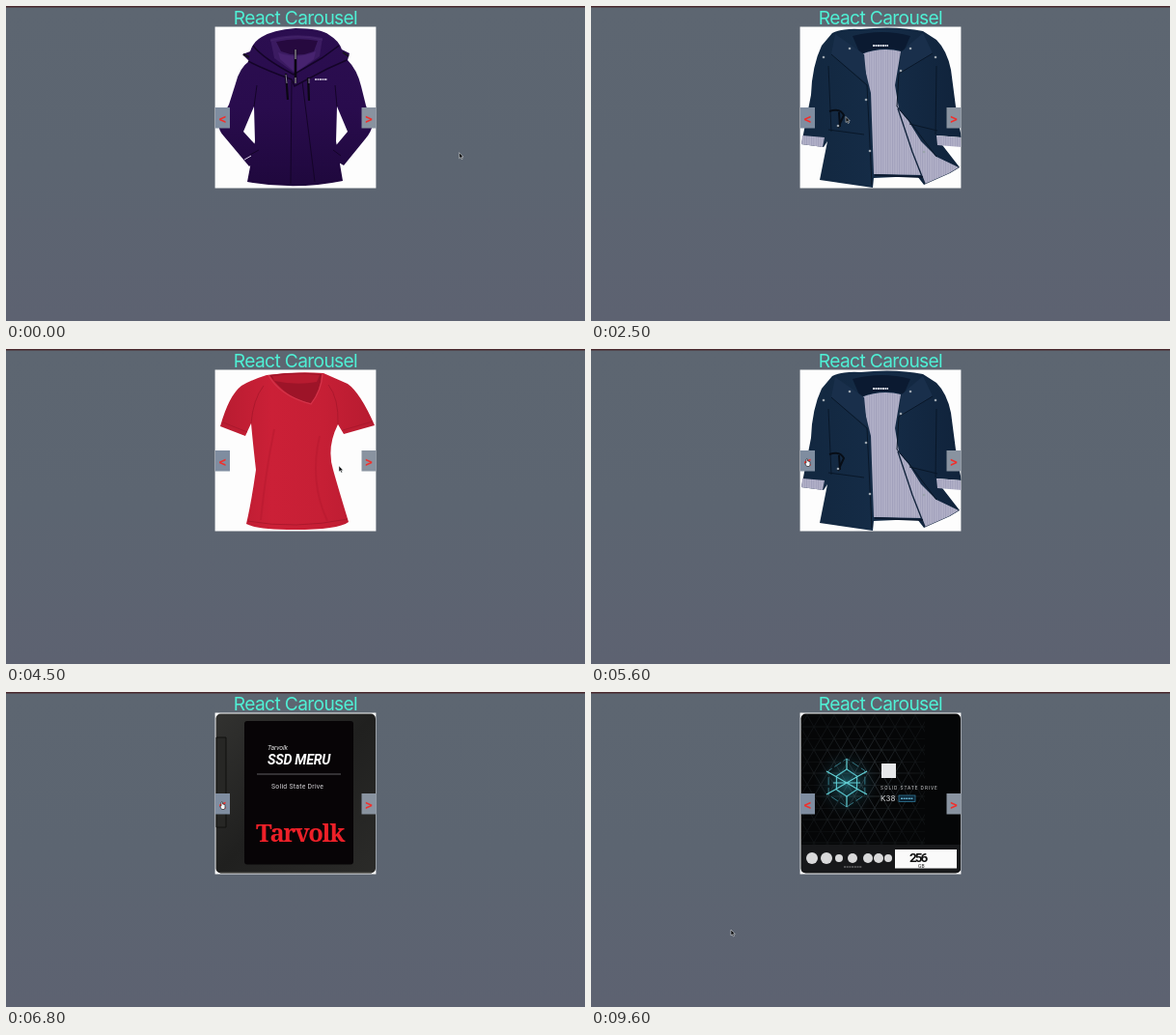
Write an HTML page that moves like this. It is 600 px wide and 326 px high and loops after 9.7 s.

```html
<!DOCTYPE html>
<html lang="en">
<head>
<meta charset="utf-8">
<title>React Carousel</title>
<style>
  html, body { margin: 0; width: 100%; height: 100%; overflow: hidden; background: #5c6571; }
  svg { display: block; width: 100%; height: 100%; }
  text { font-family: Inter, "Open Sans", sans-serif; }
  .serif { font-family: "Noto Serif", "Liberation Serif", serif; }
  .narrow { font-family: Roboto, sans-serif; }
  .title { font-size: 19.2px; letter-spacing: -.65px; fill: #4ff0d5; text-anchor: middle; }
  .arrow { font-size: 13px; font-weight: 700; fill: #f0302c; text-anchor: middle; }
</style>
</head>
<body>
<svg id="stage" viewBox="0 0 600 326" preserveAspectRatio="none"></svg>
<script>
const LOOP = 9700;

const path = (d, fill, extra = "") => `<path d="${d}" fill="${fill}" ${extra}/>`;
const line = (d, stroke, width = 1, extra = "") =>
  `<path d="${d}" fill="none" stroke="${stroke}" stroke-width="${width}" ${extra}/>`;
const rect = (x, y, w, h, fill, extra = "") =>
  `<rect x="${x}" y="${y}" width="${w}" height="${h}" fill="${fill}" ${extra}/>`;
const dot = (x, y, r, fill) => `<circle cx="${x}" cy="${y}" r="${r}" fill="${fill}"/>`;
const text = (x, y, size, fill, content, extra = "") =>
  `<text x="${x}" y="${y}" font-size="${size}" fill="${fill}" ${extra}>${content}</text>`;
const gradient = (id, stops, extra = "") =>
  `<linearGradient id="${id}" ${extra}>${stops.map((color, i) =>
    `<stop offset="${i / (stops.length - 1)}" stop-color="${color}"/>`).join("")}</linearGradient>`;

const defs = `<defs>
  ${gradient("backdrop", ["#5d6671", "#5c6571", "#5d6271"], 'x2="0" y2="1"')}
  ${gradient("purple", ["#2b0e50", "#290c4d", "#1f083d"], 'x2="0" y2="1"')}
  ${gradient("navy", ["#12273f", "#152c47", "#10233b"])}
  ${gradient("red", ["#b81c31", "#cb2037", "#c61f35", "#b71b30"])}
  ${gradient("white", ["#e2e2e5", "#fafafa", "#dedee2"])}
  ${gradient("metal", ["#55565b", "#a4a5a9", "#77787d"])}
  ${gradient("casing", ["#323230", "#20201f", "#2b2b29"], 'x2="1" y2="1"')}
  ${gradient("screen", ["#18365c", "#7e3f89", "#df804c"], 'x2="1" y2="1"')}
  <radialGradient id="glow"><stop stop-color="#2c94a4" stop-opacity=".55"/>
    <stop offset="1" stop-color="#10202a" stop-opacity="0"/></radialGradient>
  <radialGradient id="meshFade"><stop stop-color="#fff"/><stop offset="1" stop-color="#444"/></radialGradient>
  <pattern id="knit" width="2.4" height="2.4" patternUnits="userSpaceOnUse">
    ${rect(0, 0, 2.4, 2.4, "#b2b1c8")}${rect(0, 0, .9, 2.4, "#9f9eb9")}</pattern>
  <pattern id="mesh" width="14" height="24" patternUnits="userSpaceOnUse">
    ${line("M0 0H14M0 12H14M0 0L14 24M14 0L0 24", "#363e42", .8)}</pattern>
  <clipPath id="frame">${rect(216.6, 21.6, 166.8, 166.8, "#fff")}</clipPath>
  <mask id="meshMask">${rect(217, 22, 130, 140, "url(#meshFade)")}</mask>
</defs>`;

function purpleJacket() {
  const shade = "#140428", edge = "#432468";
  return path("M253 47Q256 37 265 32Q276 25 300 23Q326 23 335 30Q345 36 348 45L356 49L354 56Q364 66 368 83L373 103L380 122Q379 130 372 138L350 165L333 155L354 130L343 104L342 140L349 181Q300 191 250 182L258 140L257 104L246 130L268 154L252 166L226 135Q219 128 221 120L231 102L238 80Q242 64 252 57L245 50Z", "url(#purple)") +
    path("M274 34Q300 27 328 33L325 52L300 70L278 54Z", "#3b1b61") +
    path("M280 37Q301 32 323 36L319 47Q302 54 285 47Z", "#26093f") +
    path("M282 48Q301 56 321 47L319 55L300 69L284 55Z", "#47236f") +
    line("M256 41Q266 54 298 71L327 54L345 41M251 57Q266 65 296 76L299 83L333 65L353 56", shade, 1.5) +
    line("M274 36Q301 28 328 35", edge, 1.2) +
    line("M296 78L295 184M307 78L320 182M257 104L260 82M343 104L341 82M253 154L262 149M347 155L339 149", shade) +
    line("M300 45L300 80", "#0a0610", 2.6) + line("M300 45V55M300 74V80", "#bcb5c3", 1) +
    line("M290 70L292 97M313 74L314 98", "#0b0713", 2.2) +
    line("M290 71L291 80M314 75V80", "#a99db8", .8) +
    line("M320 76H333", "#dad3e5", 1.5, 'stroke-dasharray="2 .5"') +
    line("M247 159L254 155", "#d8cde4", 1) +
    line("M246 50L252 53M349 48L355 52", "#17131d", 2);
}

function leatherJacket() {
  return path("M260 36Q300 18 341 36L359 55L378 148L363 155L344 92L346 181H255L257 92L239 155L223 148L242 55Z", "#201f23") +
    path("M262 35Q300 18 338 35L330 62L303 76L271 62Z", "#8b8b90") +
    path("M277 38Q300 29 324 38L309 70L303 184H292L293 70Z", "#b2b2b6") +
    path("M263 51L287 61L295 184H255L257 90ZM340 51L313 62L304 184H347L344 90Z", "#29282c") +
    line("M290 62L295 183M312 62L304 183M267 132L281 126M321 126L336 132", "#9a9a9d", 1.2);
}

function navyJacket() {
  const studs = [[241, 53], [268, 44], [285, 97], [289, 150], [321, 67], [331, 44], [357, 53], [256, 124], [345, 151]];
  return path("M250 28Q260 23 279 24Q315 20 344 26L358 35Q369 46 373 66L379 112L384 136L358 134L361 140L382 167L372 173L345 185L338 176L293 178L292 188L237 180L245 140L241 146L218 143L228 92Q229 62 239 41Z", "url(#navy)") +
    path("M280 50Q301 42 321 47L315 82L319 106L334 150L344 175L293 174L290 90Z", "url(#knit)") +
    path("M318 106L329 119L342 140L358 156L381 167L371 173L346 184L333 151Z", "url(#knit)") +
    line("M318 106L333 151L346 184", "#14263e", 1.4) +
    path("M271 31Q302 23 331 31L324 47Q302 40 279 50Z", "#0b1a31") +
    path("M253 29L283 50L286 80L249 50ZM344 28L322 47L319 70L354 49Z", "#192f4b") +
    line("M249 50L286 82L291 185M354 49L319 70L317 104L330 119L358 156M246 128L283 133M330 122L359 129M246 62L249 130M358 62L357 133", "#091728", 1) +
    line("M292 41H308", "#d7dbe4", 2, 'stroke-dasharray="2 .5"') +
    line("M247 109Q258 105 262 113L256 126M257 110L258 125", "#070d16", 2) +
    line("M294 175L344 177", "#0d1b30", 2) +
    path("M219 134L242 136L240 146L218 143ZM358 134L383 136L384 146L359 144Z", "url(#knit)") +
    studs.map(([x, y]) => dot(x, y, 1.3, "#9ba4ad")).join("");
}

function whiteTop() {
  return path("M262 29Q300 44 338 29Q355 33 365 44L379 86L350 96L343 76Q340 122 352 179Q302 191 249 179Q261 121 257 76L249 96L222 86L237 44Q246 34 262 29Z", "url(#white)") +
    line("M262 30Q300 49 338 30M257 76L254 58M343 76L346 58M278 92Q271 128 265 179M320 92Q326 137 331 179", "#c8c8cd", 1);
}

function redShirt() {
  return path("M270 27Q300 23 329 25L354 36Q367 45 382 79L350 88L344 78Q332 102 339 125Q344 143 355 179Q344 187 299 187Q260 187 249 181Q254 160 259 125Q256 99 254 77L248 90L222 80Q231 48 244 38Q254 32 270 27Z", "url(#red)") +
    path("M273 27Q300 23 327 26Q326 43 316 56Q291 52 273 27Z", "#9d1428") +
    path("M276 28Q300 24 325 27L322 34Q302 38 278 33Z", "#b71b30") +
    line("M272 27Q283 48 316 57Q327 43 328 26", "#d5344a", 1.2) +
    line("M254 77Q256 52 267 38M344 78Q345 51 334 37M225 76L250 86M349 84L380 75M250 178Q300 187 354 176", "#a6172b", .8) +
    line("M278 83Q269 127 264 177M325 90Q314 137 333 178", "#b5192f", 2, 'opacity=".5"');
}

function curvedMonitor() {
  const rays = Array.from({ length: 25 }, (_, i) => {
    const a = Math.PI * (-.15 + i * 1.3 / 24), c = Math.cos(a), s = Math.sin(a);
    return `M${295 + 13 * c} ${106 + 8 * s}L${295 + 33 * c} ${106 + 26 * s}`;
  }).join("");
  const slogan = ["QLED", "GAMING", "MONITOR"].map((word, i) =>
    text(0, i * 13, 13.3, "#e9e9ec", word, 'class="narrow" font-weight="700" letter-spacing="-1.15"')).join("");
  return path("M218 22Q304 39 383.5 45V133Q300 138 218 152Z", "#040405") +
    line("M218 23Q304 39 383 45.5", "#54575b", .9) +
    line("M218 151Q300 137 383 132.5", "#67696e", 1.8) +
    text(224, 38, 4.5, "#eee", "QUOLVEN", 'font-weight="700" transform="rotate(5 224 38)"') +
    path("M287 70Q293 64 302 70L304 84L300 91L307 97L316 111L313 134L276 139L274 112L281 97L288 91Z", "#2c3035") +
    path("M291 70Q299 67 301 80L296 89L291 83ZM282 101L292 96L296 115L284 121ZM304 99L313 111L307 123Z", "#626a70") +
    line(rays, "#5aaccc", .8) +
    `<g transform="translate(321 89) rotate(-6)">${slogan}</g>` +
    path("M270 144L281 142V163L270 165Z", "#24262a") + line("M270 144V166", "#aaa", 1.5) +
    path("M268 165L284 162L369 163L368 168L302 170L268 187L261 187L279 169L268 170Z", "url(#metal)") +
    line("M262 186L284 170L368 166", "#d0d0d3", 1);
}

function flatMonitor() {
  return rect(219, 42, 162, 100, "#191a1d", 'rx="2"') + rect(222, 45, 156, 91, "url(#screen)") +
    path("M222 112Q270 60 319 94T378 64V136H222Z", "#203e69", 'opacity=".65"') +
    path("M294 142H307L311 162H290Z", "#27282b") + path("M268 168L291 160H312L333 168Z", "#333438");
}

function portableDrive() {
  return rect(240, 27, 121, 157, "#191a1c", 'rx="5"') + path("M242 29H359V83L242 116Z", "#2a2b2e") +
    line("M242 116L359 83M246 125L355 94", "#47494c", 1.2) + rect(253, 158, 10, 10, "#bfc1c4");
}

function redDrive() {
  return rect(217.5, 22.5, 165.5, 165, "url(#casing)", 'rx="5"') +
    line("M222 187H379", "#52524e", 1) +
    path("M218 47H228V140H218Z", "#272725", 'stroke="#11110f" stroke-width="1"') +
    rect(247, 30, 113, 148.5, "#070406", 'rx="3"') +
    text(271, 60, 7, "#ddd", "Tarvolk", 'class="narrow" font-style="italic" letter-spacing="-.15"') +
    text(271, 75, 14.2, "#fff", "SSD MERU", 'class="narrow" font-style="italic" font-weight="700" letter-spacing="-.25"') +
    line("M260 85H347", "#77767a", .8) +
    text(275, 99.5, 6.8, "#d6d5d8", "Solid State Drive", 'class="narrow" letter-spacing=".28"') +
    text(259, 155, 25.5, "#ed2028", "Tarvolk", 'class="serif" font-weight="600" letter-spacing="-1.4"');
}

function blueDrive() {
  const hexagon = (r) => "M" + Array.from({ length: 6 }, (_, i) => {
    const a = Math.PI * (i / 3 + .5);
    return `${265 + r * .87 * Math.cos(a)} ${94 + r * Math.sin(a)}`;
  }).join("L") + "Z";
  const marks = [[229, 6], [244, 6], [257, 4], [271, 5], [287, 5], [298, 5], [308, 4]];
  return rect(217.5, 22.5, 165.5, 165, "#050607", 'rx="5"') +
    rect(218, 23, 128, 136, "url(#mesh)", 'mask="url(#meshMask)"') +
    dot(265, 94, 35, "url(#glow)") +
    line(hexagon(25), "#347784", 1, 'stroke-dasharray="8 3"') + line(hexagon(14), "#53bdc6", 1.2) +
    line("M265 80V69M265 108V119M253 87L244 82M277 87L286 82M253 101L244 106M277 101L286 106M253 87L277 101M277 87L253 101M251 94H279", "#63d0d5", 1.2) +
    rect(301, 74, 15, 15, "#e6e7e9") +
    text(300, 101, 4.7, "#d5d6d8", "SOLID STATE DRIVE", 'letter-spacing=".9"') +
    text(300, 113, 8, "#d7d8da", "K38", 'letter-spacing=".1"') +
    rect(319, 107, 17, 6.5, "#0c2333", 'stroke="#3484a7" stroke-width=".7"') +
    line("M321 110.3H334", "#62aeca", 1.5, 'stroke-dasharray="2 .6"') +
    path("M218 158H383V184Q382 187 378 187H223Q218 187 218 184Z", "#17181a") +
    marks.map(([x, r]) => dot(x, 172, r, "#d9d9da")).join("") +
    line("M262 181H281", "#aaa", .8, 'stroke-dasharray="2 .7"') +
    rect(315, 163, 64, 19.5, "#fafafa") +
    text(330, 175.5, 13.5, "#111", "256", 'class="narrow" font-weight="700" letter-spacing="-2"') +
    text(339, 181.5, 5, "#222", "GB", 'class="narrow"');
}

const slides = [redDrive, blueDrive, portableDrive, flatMonitor, curvedMonitor,
  purpleJacket, leatherJacket, navyJacket, whiteTop, redShirt];

const button = (x, sign, fill) => rect(x, 105, 15, 21.5, fill) +
  `<text class="arrow" x="${x + 7.4}" y="120.9">${sign}</text>`;

const stage = document.getElementById("stage");
stage.innerHTML = defs +
  rect(0, 0, 600, 326, "url(#backdrop)") + rect(0, 0, 600, 1.5, "#49282d") +
  `<text class="title" x="300" y="19.3">React Carousel</text>` +
  `<g clip-path="url(#frame)">${rect(216, 21, 169, 169, "#fdfdfd")}
    ${slides.map((draw) => `<g class="slide">${draw()}</g>`).join("")}</g>` +
  button(217, "&lt;", "#7f8da0") + button(368.5, "&gt;", "#8993a0") +
  `<g id="pointer">
    ${path("M0 0V6L1.4 4.8L2.4 7L3.5 6.5L2.5 4.4H4.3Z", "#08090b", 'stroke="#e2e5e8" stroke-width=".55"')}
    ${path("M1 1Q2 0 2.6 1V3L5 3.6V7L4.2 8.5H1.6L-.3 5.6L1 5Z", "#f4f4f6", 'stroke="#24262b" stroke-width=".7"')}
  </g>`;

const slideNodes = [...stage.querySelectorAll(".slide")];
const pointer = stage.querySelector("#pointer");
const [arrowCursor, handCursor] = pointer.children;
const show = (node, visible) => { node.style.display = visible ? "" : "none"; };

// Pointer stops: time, x, y
const stops = [[0, 469.6, 151.7], [1650, 469.6, 151.7], [2450, 264, 114.5], [2700, 264, 114.5],
  [3300, 345, 121], [4700, 345, 121], [5200, 222, 113], [7000, 222, 113], [7600, 145, 246], [LOOP, 145, 246]];

function pointerAt(t) {
  const i = stops.findIndex((stop) => stop[0] > t);
  const [t0, x0, y0] = stops[i - 1], [t1, x1, y1] = stops[i];
  const p = (t - t0) / (t1 - t0), ease = p * p * (3 - 2 * p);
  return [x0 + (x1 - x0) * ease, y0 + (y1 - y0) * ease];
}

// Automatic steps forward, then quick clicks back, then automatic again
function slideAt(t) {
  if (t < 700) return 5;
  if (t < 5400) return Math.min(9, 6 + Math.floor((t - 700) / 1100));
  if (t < 8600) return Math.max(0, 8 - Math.floor((t - 5400) / 165));
  return 1;
}

function render(t) {
  const current = slideAt(t), [x, y] = pointerAt(t);
  slideNodes.forEach((node, i) => show(node, i === current));
  const overButton = y > 105 && y < 127 && x > 217 && x < 232;
  show(arrowCursor, !overButton);
  show(handCursor, overButton);
  pointer.setAttribute("transform", `translate(${x.toFixed(2)} ${y.toFixed(2)})`);
}

const start = performance.now();
function tick(now) {
  render(Math.max(0, now - start) % LOOP);
  requestAnimationFrame(tick);
}
render(0);
requestAnimationFrame(tick);
</script>
</body>
</html>
```
